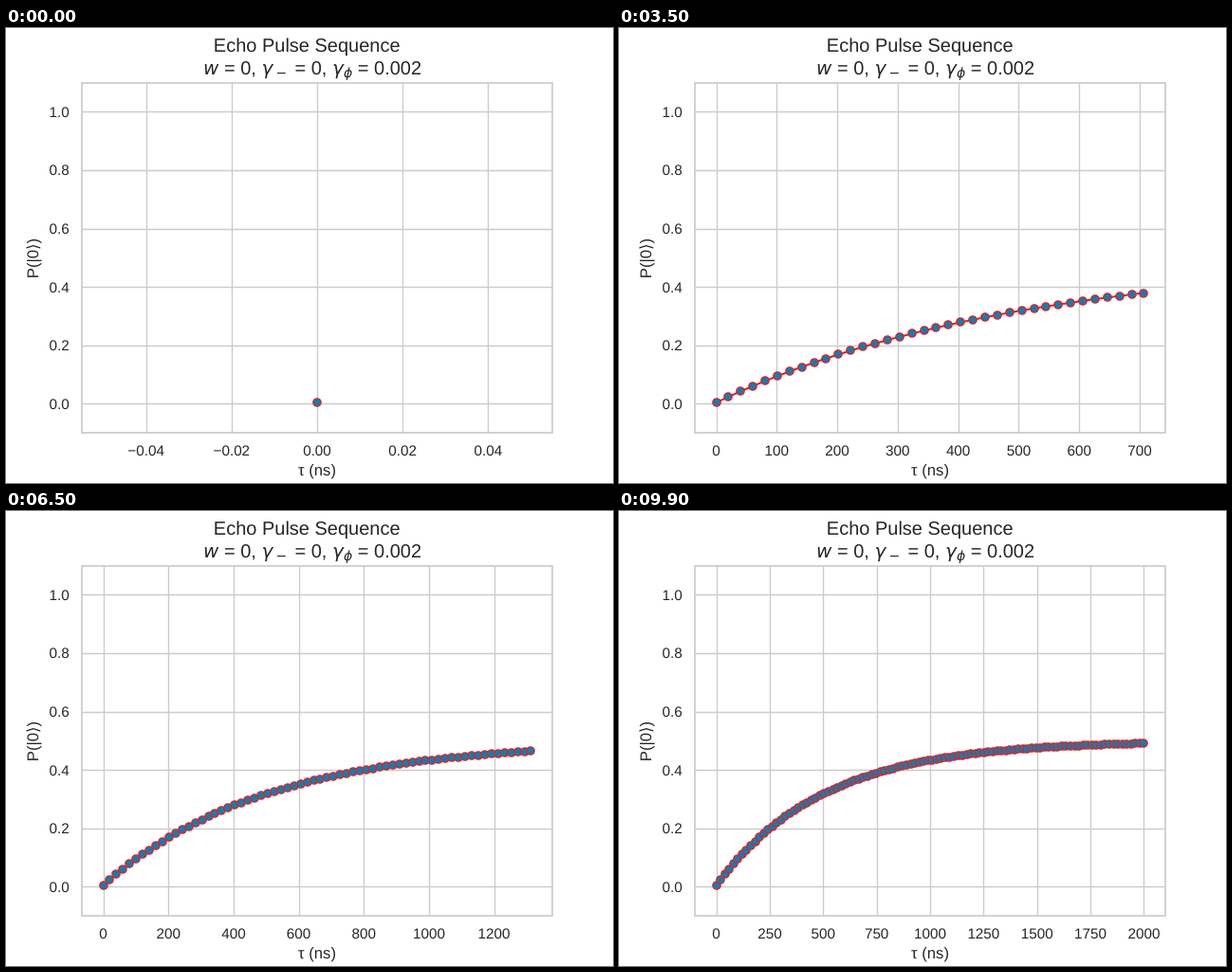
Animation of 640 by 480 pixels, one loop 10 s. Source, as an HTML page:

```html
<!DOCTYPE html>
<html lang="en">
<head>
<meta charset="utf-8">
<title>Echo Pulse Sequence</title>
<style>
  html, body { margin: 0; width: 100%; height: 100%; overflow: hidden; background: #fff; }
  svg { display: block; width: 640px; height: 480px; }
  text { font-family: "Liberation Sans", Arial, "DejaVu Sans", sans-serif; fill: #262626; white-space: pre; text-rendering: geometricPrecision; }
  .title { font-size: 20px; }
  .math { font-family: "DejaVu Sans", sans-serif; font-style: italic; }
  .sub { font-family: "DejaVu Sans", sans-serif; font-size: 14px; }
  .label { font-size: 16.67px; text-anchor: middle; }
  .tick { font-size: 15.28px; }
  .grid { stroke: #ccc; stroke-width: 1.39; }
  .frame { fill: none; stroke: #ccc; stroke-width: 1.74; }
  .curve { fill: none; stroke: #d62728; stroke-width: 2.08; stroke-linejoin: round; }
  .dot { fill: #1f77aa; stroke: #d62728; stroke-width: 1.39; }
</style>
</head>
<body>
<svg viewBox="0 0 640 480">
  <g id="rows"></g>
  <g id="columns"></g>
  <g id="data"></g>
  <rect class="frame" x="80" y="58" width="496" height="369"/>
  <g class="title">
    <text x="218.8" y="25">Echo Pulse Sequence</text>
    <text x="207.9" y="49" class="math">w</text>
    <text x="229.9" y="49">= 0,</text>
    <text x="269.4" y="49" class="math">γ</text>
    <text x="284.6" y="51.5" class="sub">−</text>
    <text x="304.5" y="49">= 0,</text>
    <text x="344" y="49" class="math">γ</text>
    <text x="355.9" y="51.5" class="sub math">ϕ</text>
    <text x="370.8" y="49">= 0.002</text>
  </g>
  <text class="label" x="328" y="472">τ (ns)</text>
  <text class="label" transform="translate(34 243) rotate(-90)">P(|0⟩)</text>
</svg>
<script>
const POINTS = 100, STEP_MS = 100, T_MAX = 2000, RATE = 0.002;
const LEFT = 80, RIGHT = 576, TOP = 57.6, BOTTOM = 427.2;
const MAX_BINS = 9, MARGIN = 0.05;
const [rows, columns, data] = ["rows", "columns", "data"].map(id => document.getElementById(id));

const tau = k => k * T_MAX / (POINTS - 1);
const prob = t => 0.5 - 0.496 * Math.exp(-RATE * t);
const yOf = p => BOTTOM - (p + 0.1) / 1.2 * (BOTTOM - TOP);
const snap = v => Math.floor(v + 0.5) + 0.5;

const line = (x1, y1, x2, y2) =>
  `<line class="grid" x1="${x1}" y1="${y1}" x2="${x2}" y2="${y2}"/>`;
const tick = (x, y, anchor, s) =>
  `<text class="tick" x="${x}" y="${y}" text-anchor="${anchor}">${s}</text>`;

// Smallest round step that keeps the tick count within MAX_BINS
function niceStep(span) {
  const raw = span / MAX_BINS;
  const scale = 10 ** Math.floor(Math.log10(raw));
  return [1, 2, 2.5, 5, 10].find(s => s * scale >= raw) * scale;
}

function drawRows() {
  let out = "";
  for (let i = 0; i <= 5; i++) {
    const y = yOf(i / 5);
    out += line(LEFT, snap(y), RIGHT, snap(y));
    out += tick(66.8, Math.round(y + 5.4), "end", (i / 5).toFixed(1));
  }
  rows.innerHTML = out;
}

function draw(n) {
  const last = tau(n);
  const lo = n ? -MARGIN * last : -0.055;
  const hi = n ? last - lo : 0.055;
  const xOf = t => LEFT + (t - lo) / (hi - lo) * (RIGHT - LEFT);

  const step = niceStep(hi - lo);
  const digits = step < 1 ? 2 : step < 5 ? 1 : 0;
  let out = "";
  for (let i = Math.ceil(lo / step); i * step <= hi; i++) {
    const x = xOf(i * step);
    const value = Math.abs(i * step).toFixed(digits);
    out += line(snap(x), 58, snap(x), 427);
    out += tick(x, 451, "middle", (i < 0 ? "−" : "") + value);
  }
  columns.innerHTML = out;

  let path = "", dots = "";
  for (let k = 0; k <= n; k++) {
    const x = xOf(tau(k)), y = yOf(prob(tau(k)));
    path += `${x.toFixed(2)},${y.toFixed(2)} `;
    dots += `<circle class="dot" cx="${Math.round(x)}" cy="${Math.round(y)}" r="4.17"/>`;
  }
  data.innerHTML = (n ? `<polyline class="curve" points="${path}"/>` : "") + dots;
}

let shown = -1;
function update() {
  const n = Math.floor(performance.now() / STEP_MS) % POINTS;
  if (n !== shown) draw(shown = n);
  requestAnimationFrame(update);
}

drawRows();
update();
</script>
</body>
</html>
```
